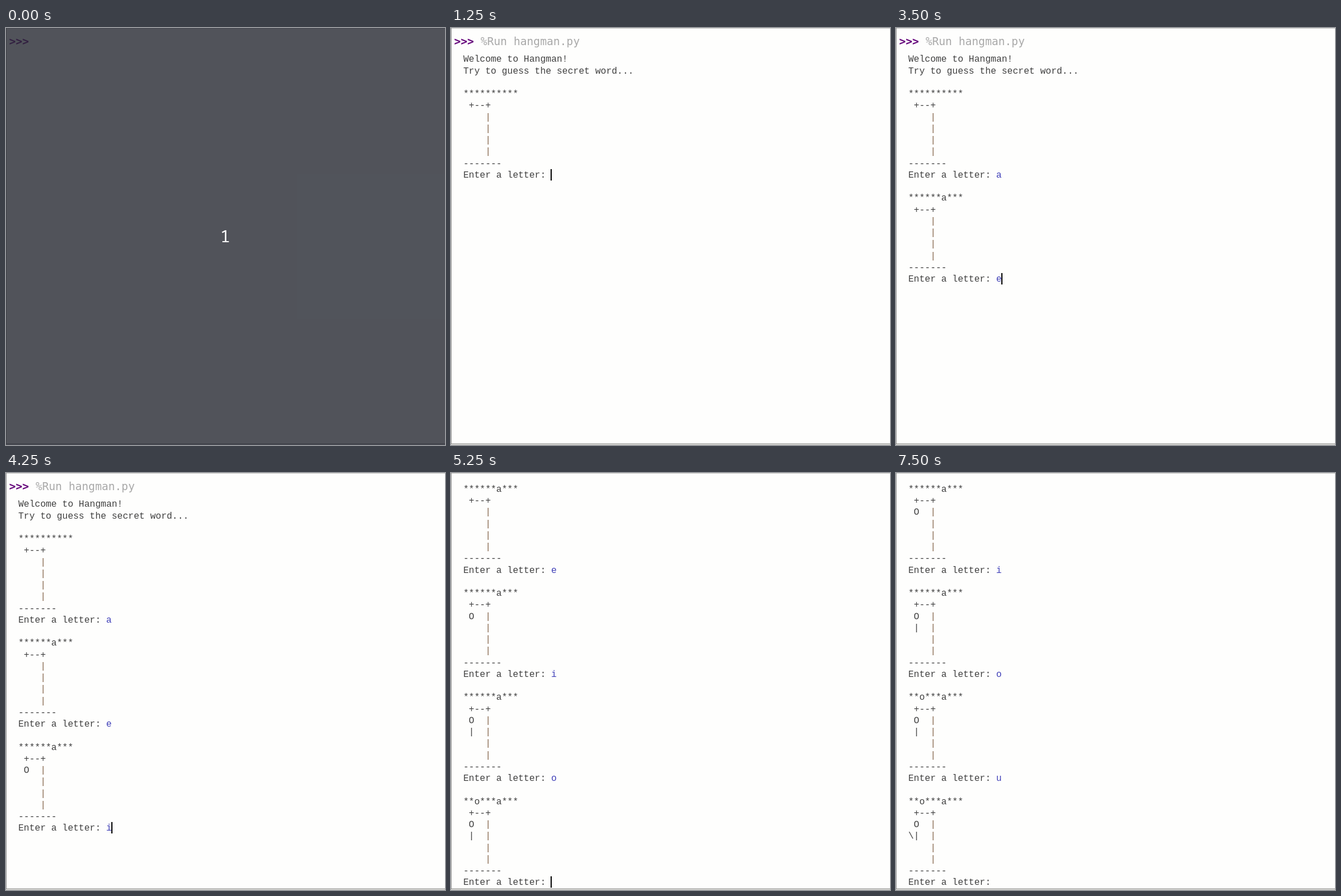
Animation of 767 by 730 pixels, one loop 8 s. Source, as an HTML page:

```html
<!DOCTYPE html>
<html lang="en">
<head>
<meta charset="utf-8">
<title>Hangman in the shell</title>
<style>
  html, body { margin: 0; width: 100%; height: 100%; overflow: hidden; background: #fefefd; }
  svg { display: block; width: 767px; height: 730px; }
  text { white-space: pre; font: 16px "Liberation Mono", monospace; fill: #404040; }
  .shell { font: 19.2px "DejaVu Sans Mono", monospace; fill: #a9a9a9; }
  .prompt { font-weight: bold; fill: #64007a; }
  .pole { fill: #846448; }
  .typed { fill: #4040b8; }
  .count { font: 29px "Noto Sans Mono", monospace; fill: #fff; text-anchor: middle; }
</style>
</head>
<body>
<svg viewBox="0 0 767 730">
  <rect width="767" height="730" fill="#fefefd"/>
  <g id="screen"></g>
  <rect width="767" height="1" fill="#c4c4c2"/>
  <rect width="1" height="729" fill="#949492"/>
  <rect y="727.5" width="767" height="1.5" fill="#949490"/>
  <g id="veil">
    <rect width="767" height="730" fill="#262933" fill-opacity=".8"/>
    <text class="count" x="383" y="375">1</text>
  </g>
</svg>
<script>
const LOOP = 8000, VEIL_END = 250, RUN = 750;
const LEFT = 21.5, CHAR = 9.6, TOP = 59.3, LINE = 20.25, LAST = 721.3;
const BLINK = 900, BLINK_ON = 600;
const screen = document.getElementById('screen');
const veil = document.getElementById('veil');

// The player's guesses drive the game; unrevealed letters stay starred.
const secret = '**o***a***';
const guesses = 'aeiou';

// Moments of activity: a round is printed, a letter typed, and so on in turn.
const beats = [1120, 2940, 3240, 3490, 3740, 4240, 4490, 4740, 4990, 5890, 6890];

function mask(tried) {
  return secret.replace(/[a-z]/g, c => tried.includes(c) ? c : '*');
}

function body(tried) {
  const misses = [...tried].filter(c => !secret.includes(c)).length;
  const head = misses > 0 ? ' O' : '';
  const trunk = (misses > 2 ? '\\' : ' ') + (misses > 1 ? '|' : '');
  return [head, trunk, '', ''];
}

function text(str, x, y, cls = '') {
  return `<text class="${cls}" x="${x}" y="${y}">${str.replace(/>/g, '&gt;')}</text>`;
}

function paint(rounds, typed, caret, running) {
  const end = 9 * rounds + 1;
  const scroll = Math.max(0, TOP + end * LINE - LAST);
  const rowY = row => Math.round(TOP + row * LINE - scroll);
  const at = (str, col, row, cls) => text(str, LEFT + col * CHAR, rowY(row), cls);

  let out = text('>>>', 5.5, 30 - scroll, 'shell prompt');
  if (running) out += text('%Run hangman.py', 51.7, 30 - scroll, 'shell');
  if (rounds) {
    out += at('Welcome to Hangman!', 0, 0) + at('Try to guess the secret word...', 0, 1);
  }

  for (let k = 0; k < rounds; k++) {
    const row = 3 + 9 * k;
    const tried = guesses.slice(0, k);
    out += at(mask(tried), 0, row) + at(' +--+', 0, row + 1);
    body(tried).forEach((part, i) => {
      out += at(part, 0, row + 2 + i) + at('|', 4, row + 2 + i, 'pole');
    });
    out += at('-------', 0, row + 6) + at('Enter a letter: ', 0, row + 7);
    if (k < typed) out += at(guesses[k], 16, row + 7, 'typed');
  }

  if (caret) {
    const col = typed === rounds ? 17 : 16;
    const x = Math.round(LEFT + col * CHAR) - 1;
    out += `<rect x="${x}" y="${rowY(end) - 15}" width="2" height="20" fill="#000"/>`;
  }
  screen.innerHTML = out;
}

let shown = '';
function draw(t) {
  const done = beats.filter(b => b <= t).length;
  const rounds = Math.ceil(done / 2), typed = Math.floor(done / 2);
  // Any activity restarts the caret's blink.
  const caret = done > 0 && (t - beats[done - 1]) % BLINK < BLINK_ON;
  const state = [rounds, typed, caret, t >= RUN];
  if (state.join() !== shown) {
    paint(...state);
    shown = state.join();
  }
  veil.style.display = t < VEIL_END ? '' : 'none';
}

const start = performance.now();
function tick() {
  draw((performance.now() - start) % LOOP);
  requestAnimationFrame(tick);
}
tick();
</script>
</body>
</html>
```
